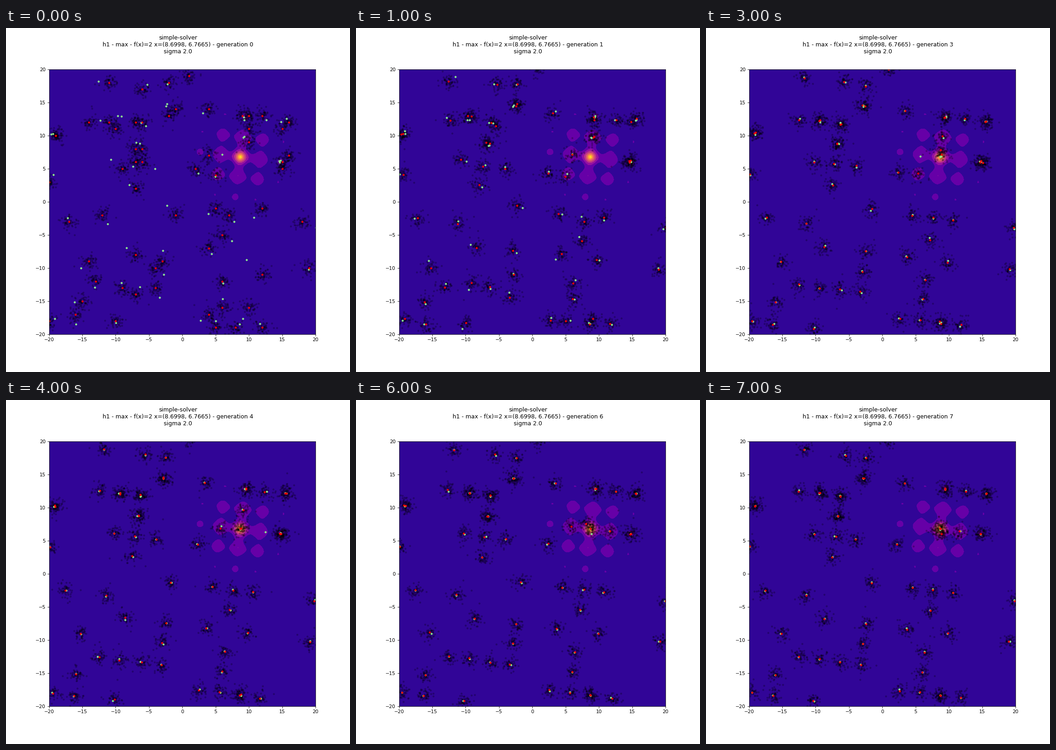
Write a matplotlib script that moves like this. It is 748 px wide and 748 px high and loops after 8000 ms.

```python
import numpy as np
import matplotlib.pyplot as plt
from matplotlib.animation import FuncAnimation

GENERATIONS = 8
CHILDREN = 60
PEAK = np.array([8.6998, 6.7665])

# Columns of the occupied hills in each row of the hill lattice
HILLS = {
    6: [-1],
    5: [-5, -3, -2],
    4: [-2, -2, 0, 2, 2, 3, 4, 4],
    3: [-5, -4, -4, -3, -3, 2, 2],
    2: [-7, -7, -3, -3, 1, 4, 4, 4],
    1: [-4, -3, -2, 0, 1],
    0: [-7, -3],
    -1: [-1, 1, 2, 3, 6],
    -2: [-6, -4, 2],
    -3: [-3, -1, 1, 3, 6],
    -4: [-5, -1, 2],
    -5: [-4, -3, -2, -1, 2],
    -6: [-5, 1, 2, 3, 3, 4],
    -7: [-6, -5, -3],
}

# Steps to a higher neighbouring hill: generation -> [(from, to)]
CLIMBS = {
    2: [((1, 2), (2, 2)), ((2, 3), (2, 2))],
    3: [((1, 1), (1, 2))],
    4: [((4, 2), (3, 2))],
    5: [((2, 3), (2, 2))],
    6: [((1, 2), (2, 2))],
}


def h1(x, y):
    dist = np.hypot(x - PEAK[0], y - PEAK[1])
    return (np.sin(x - y / 8) ** 2 + np.sin(y + x / 8) ** 2) / (dist + 1)


def hilltop(cells):
    """Local maxima of h1: a tilted lattice, drawn slightly to the peak."""
    u, v = (np.array(cells).T + .5) * np.pi
    tops = np.column_stack((u + v / 8, v - u / 8)) / (1 + 1 / 64)
    dist = np.hypot(*(PEAK - tops).T)[:, None]
    return tops + (PEAK - tops) / (dist + .1) / (1 + dist)


def evolve():
    rng = np.random.default_rng(11)
    cells = [(col, row) for row, cols in HILLS.items() for col in cols]
    start = hilltop(cells) + rng.normal(0, .9, (len(cells), 2))
    parents = np.clip(np.round(start), -20, 19)
    states = []
    for gen in range(GENERATIONS):
        jitter = np.full((len(cells), 1), .4 / (1 + gen))
        for old, new in CLIMBS.get(gen, []):
            i = cells.index(old)
            cells[i] = new
            jitter[i] = .45
        best = hilltop(cells) + jitter * rng.normal(size=parents.shape)
        spread = .52 * rng.standard_t(9, (CHILDREN,) + parents.shape)
        states.append(((parents + spread).reshape(-1, 2), best, parents))
        parents = best
    return states


STATES = evolve()

fig, ax = plt.subplots(figsize=(10, 10), dpi=74.8)
X, Y = np.meshgrid(*[np.linspace(-20, 20, 200)] * 2)
ax.contourf(X, Y, h1(X, Y), levels=np.linspace(0, 2, 9), cmap="plasma")
title = fig.suptitle("")


def dots(color, alpha=1):
    return ax.scatter([], [], s=10, color=color, alpha=alpha)


layers = dots("black", .2), dots("lightgreen"), dots("red")
ax.set(xlim=(-20, 20), ylim=(-20, 20))


def draw(gen):
    for layer, points in zip(layers, STATES[gen]):
        layer.set_offsets(points)
    title.set_text("simple-solver\n"
                   f"h1 - max - f(x)=2 x=({PEAK[0]}, {PEAK[1]})"
                   f" - generation {gen}\nsigma 2.0")
    return (*layers, title)


anim = FuncAnimation(fig, draw, frames=GENERATIONS, interval=1000,
                     repeat=True, repeat_delay=0)
plt.show()
```
